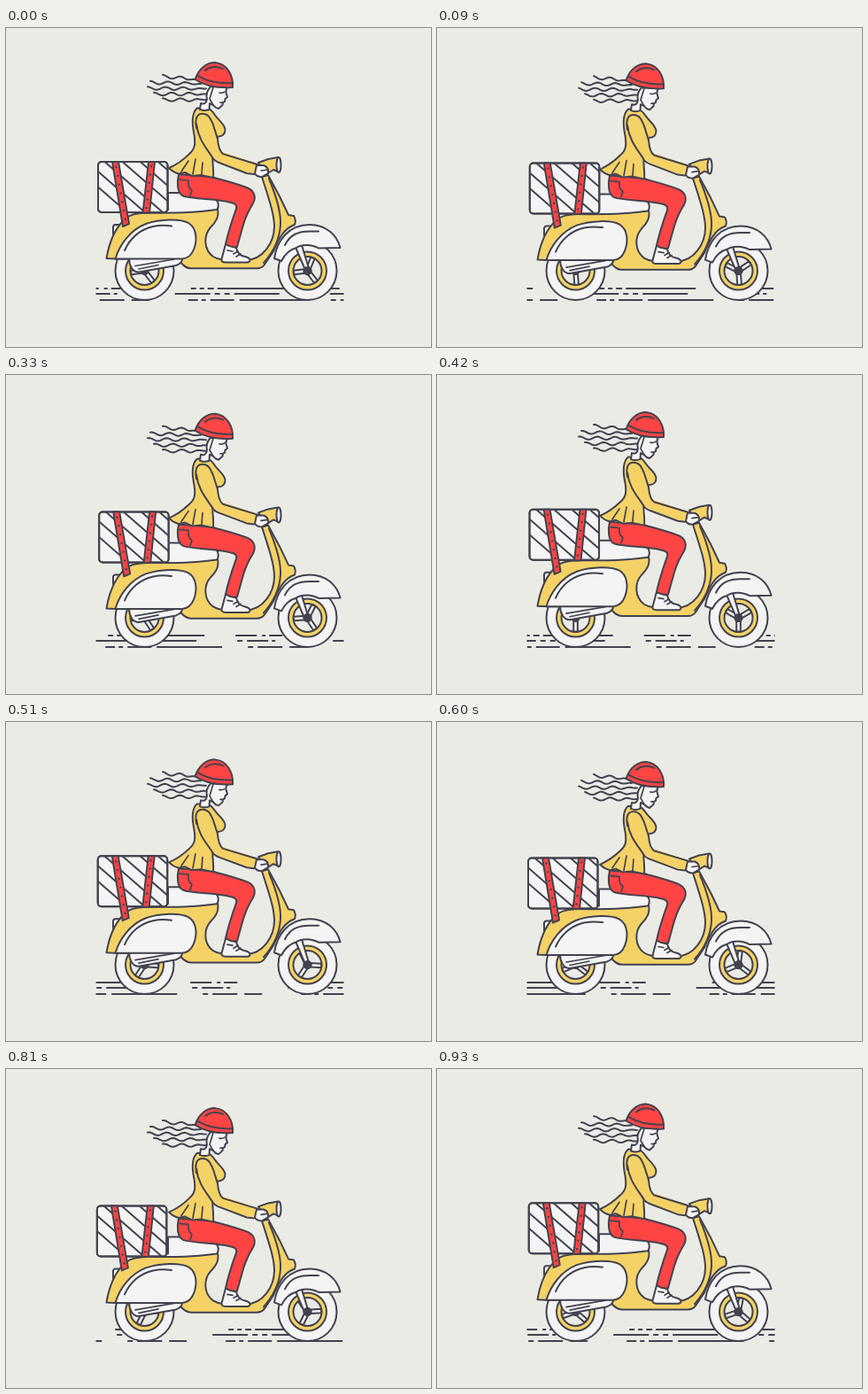
An HTML page that plays this animation: 480 px wide and 360 px high, repeating every 960 ms.

```html
<!DOCTYPE html>
<html lang="en">
<head>
<meta charset="utf-8">
<title>Scooter ride</title>
<style>
html, body { margin: 0; width: 100%; height: 100%; overflow: hidden; background: #ebebe6; }
svg { display: block; width: 100vw; height: 100vh; }
.ink { fill: none; stroke: #42434f; stroke-width: 2; stroke-linecap: round; stroke-linejoin: round; }
.w { fill: #f4f4f4; }
.y { fill: #f5d265; }
.r { fill: #ff4444; }
.bg { fill: #ebebe6; }
.dark { fill: #42434f; }
.thin { stroke-width: 1.7; }
</style>
</head>
<body>
<svg viewBox="0 0 480 360" class="ink">
  <defs>
    <clipPath id="road"><rect x="101.500" y="288" width="280" height="24"/></clipPath>
    <clipPath id="crate"><rect x="104" y="151" width="78.500" height="57" rx="4"/></clipPath>
    <g id="wheel">
      <circle class="w" r="33"/>
      <circle class="y" r="21.500"/>
      <circle class="bg" r="16"/>
    </g>
  </defs>

  <g id="lines" clip-path="url(#road)" stroke-linecap="butt"></g>

  <g transform="translate(156.500 274)"><use href="#wheel"/><g class="spokes"></g></g>
  <g transform="translate(340.500 274)"><use href="#wheel"/><g class="spokes"></g></g>

  <g id="body">
    <!-- fork and front mudguard -->
    <path class="w" d="M326 245L338 273H342.500L334 245Z"/>
    <path class="w" d="M303 260C306 240 319 222 343 222C362 222 374 234 377.500 248L353 248.500C345 244 334 244 328 248Q317 251 311 263Z"/>
    <path d="M315 245C321 233 330 229.500 343 229.500H353"/>

    <!-- chassis -->
    <path class="w" d="M130 222H123Q120.500 223 121 226V232Q121 235 124 235H130Z"/>
    <path class="y" d="M113.500 260C116 245 121 230 131 219C138 210 148 209 160 208.500L239 204C241 213 237 219 231 225C223 234 223 250 234 258C240 262 248 262 260 262H270C291 262 303 241 303 224C303 210 297 193 289 168L296 166L309 190L319 211L325 212Q328 217 326 222C314 226 308 238 302 252L292 267Q289 271.300 283 271.300H209C201 271.300 199 265 193 261L124 260.500Z"/>
    <path d="M297 170C304 187 311 206 310 222C309 240 300 255 291 265"/>
    <path class="w" d="M183 186H230L239 196Q241 202 238 205C212 209 184 209 155 208.500L160 205H183Z"/>
    <path class="w" d="M139 260C139 268 143 275.500 150 275.500L192 268Q200 265 199 259Z"/>
    <path class="thin" d="M146 268.500L190 261M150 272L172 267.500"/>
    <path class="w" d="M123.500 260.500C128 245 140 228 158 221C174 215.500 197 215 206 220C216 226 216 240 212 250Q208 260 199 260.500Z"/>
    <path d="M134 251C140 237 152 227 166 224Q176 222 187 223.500"/>

    <!-- crate -->
    <g id="box">
      <rect class="w" x="104" y="151" width="78.500" height="57" rx="4"/>
      <g id="stripes" clip-path="url(#crate)"></g>
      <rect x="104" y="151" width="78.500" height="57" rx="4"/>
      <path class="r" d="M120 151H127L139 221L132 224Z"/>
      <path class="r" d="M161 151H168L162 208.500H154.500Z"/>
      <g id="dots" class="dark" stroke="none"></g>
    </g>

    <!-- rider -->
    <path class="w" d="M248 244L243.500 261Q243 264.500 248 264.500H273C278 263 275 259 270 258C264 257 261 253 260 248Z"/>
    <path class="thin" d="M250 251L256 252M257 255L262 252M260 258L265 255"/>
    <path class="r" d="M195 165C193 174 193 186 200 189.500C210 193 238 193 252 196.500Q262 198 260 204C255 218 251 230 248 244Q254 248 261 247L268 222Q272 209 279 198C283 190 280 184 273 180.500C259 175 242 171 232 168Z"/>
    <path class="thin" d="M196 171L206 172Q205 180 210 183L208 189"/>

    <g id="torso">
      <path class="y" d="M216 90C209 96 210 108 212.500 120C214 130 214 136 207 142C200 149 193 154 184 158Q189 163 195 164.500L202 163L210 167L220 166L234 169C235 158 232 149 234 141C236 132 237 127 239 122.500Q248 122 247.500 114C246 107 239 103 236 98Q232 92 229 91Z"/>
      <path class="thin" d="M206 150L198 162M214 148L211 165M222 152L221 165"/>
      <path class="y" stroke="none" d="M216 99L229 97L238 118L242 139L284 153L279 165L245 154L234 146L222 125Z"/>
      <path d="M215 113C213 101 216 96.500 222 96.500C229 96.500 231 102 234 109L239 125Q240 138 245 142L284 154M215 108C217 126 227 136 233 146Q235 150 242 152.500L272 164L280 165"/>
    </g>

    <!-- steering head and hand -->
    <path class="y" d="M285 152L296 148L307 146V162L302 160L294 165Z"/>
    <ellipse class="w" cx="308" cy="154.500" rx="2.500" ry="8.500"/>
    <path class="w" d="M283 155L291 155Q297 157 296 164L289 168Q283 168 281 164Z"/>
    <path class="thin" d="M288 161L295 160"/>

    <g id="head">
      <g id="hair"></g>
      <path class="w" d="M219 92L220 85Q226 87 227 80Q225 73 231 66L250 67Q248 70 248.500 73L250 78L247.500 80L247 83L245 84L244.500 87L240 91Q236 90 234 87L230 85L229.500 92Q224 94 219 92Z"/>
      <path class="thin" d="M241 73Q244 74 247 72M234 67L230 80L234 87M242 84L245 84"/>
      <path class="r" d="M213.500 58C218 45 227 39 236 39C249 40 257 53 256 67C240 68 224 65 213.500 58Z"/>
      <path d="M217 54C227 60 241 63 256 62M225 48C230 43.500 238 42.500 245 46"/>
    </g>
  </g>
</svg>
<script>
const LOOP = 960, SPAN = 272, TAU = Math.PI * 2;
const $ = id => document.getElementById(id);

function add(parent, tag, attrs) {
  const el = document.createElementNS('http://www.w3.org/2000/svg', tag);
  for (const k in attrs) el.setAttribute(k, attrs[k]);
  return parent.appendChild(el);
}

// Road dashes: height, then start and end of each stroke
const rows = [
  [294, [206, 212], [216, 221], [225, 232], [236, 315], [350, 374], [380, 384], [388, 403]],
  [300, [188, 228], [233, 239], [244, 250], [255, 306], [352, 358], [363, 387], [391, 395]],
  [307, [203, 214], [218, 223], [228, 255], [261, 335], [364, 370], [375, 403], [411, 431]]
];
const road = add($('lines'), 'path', {
  d: rows.map(([y, ...dashes]) => [-1, 0, 1, 2].map(n =>
    dashes.map(([a, b]) => `M${a + n * SPAN} ${y}H${b + n * SPAN}`).join('')).join('')).join('')
});

const spokes = [...document.querySelectorAll('.spokes')].map(g => {
  for (let i = 0; i < 3; i++) {
    add(g, 'path', { class: 'w', d: 'M0 -2.3H15.6V2.3H0', transform: `rotate(${i * 120})` });
  }
  add(g, 'circle', { r: 4, class: 'dark' });
  return g;
});
add($('body').parentNode, 'circle', { cx: 340.5, cy: 274, r: 4, class: 'dark' });

for (let i = 0; i < 6; i++) {
  const y = 1.5 + i * 17.5;
  add($('stripes'), 'path', { d: `M104 ${y + 104 * 0.87}L183 ${y + 183 * 0.87}` });
}

for (let i = 0; i < 7; i++) {
  add($('dots'), 'circle', { cx: 124.5 + i * 1.7, cy: 157 + i * 9.8, r: 1.2 });
  if (i < 6) add($('dots'), 'circle', { cx: 164 - i * 1.1, cy: 156 + i * 9.4, r: 1.2 });
}

// Strands run from a loose tip to a root under the helmet
const strands = [
  [177, 54.5, 214, 58], [163, 61.5, 220, 63], [160, 68, 226, 68.5],
  [167, 74.5, 227, 74.5], [177, 81, 226, 81]
].map(s => ({ s, el: add($('hair'), 'path', {}) }));

function wave([x0, y0, x1, y1], shift) {
  let d = '';
  for (let i = 0; i <= 28; i++) {
    const k = i / 28, x = x0 + (x1 - x0) * k;
    const swing = 1.7 * Math.min(1, (1 - k) * 3);
    const y = y0 + (y1 - y0) * k - swing * Math.cos(TAU * (x - x0) / 20 + shift);
    d += `${i ? 'L' : 'M'}${x.toFixed(1)} ${y.toFixed(2)}`;
  }
  return d;
}

function draw(t) {
  const p = t / LOOP, a = TAU * p;
  const bob = 2.5 * (1 - Math.cos(2 * a));
  const sink = 1.9 * (1 - Math.cos(a - 0.7));
  const squash = 1 - 0.6 * sink / 76;
  $('body').setAttribute('transform', `translate(0 ${bob})`);
  $('box').setAttribute('transform', `translate(${1.4 * Math.sin(a)} 0)`);
  $('head').setAttribute('transform', `translate(0 ${sink - 0.4})`);
  $('torso').setAttribute('transform', `translate(0 ${166 * (1 - squash)}) scale(1 ${squash})`);
  road.setAttribute('transform', `translate(${3 - SPAN * p} 0)`);
  spokes.forEach(g => g.setAttribute('transform', `rotate(${52 + 360 * p})`));
  strands.forEach(({ s, el }) => el.setAttribute('d', wave(s, 0.5 * Math.sin(2 * a))));
}

const start = performance.now();
function tick() {
  draw((performance.now() - start) % LOOP);
  requestAnimationFrame(tick);
}
tick();
</script>
</body>
</html>
```
